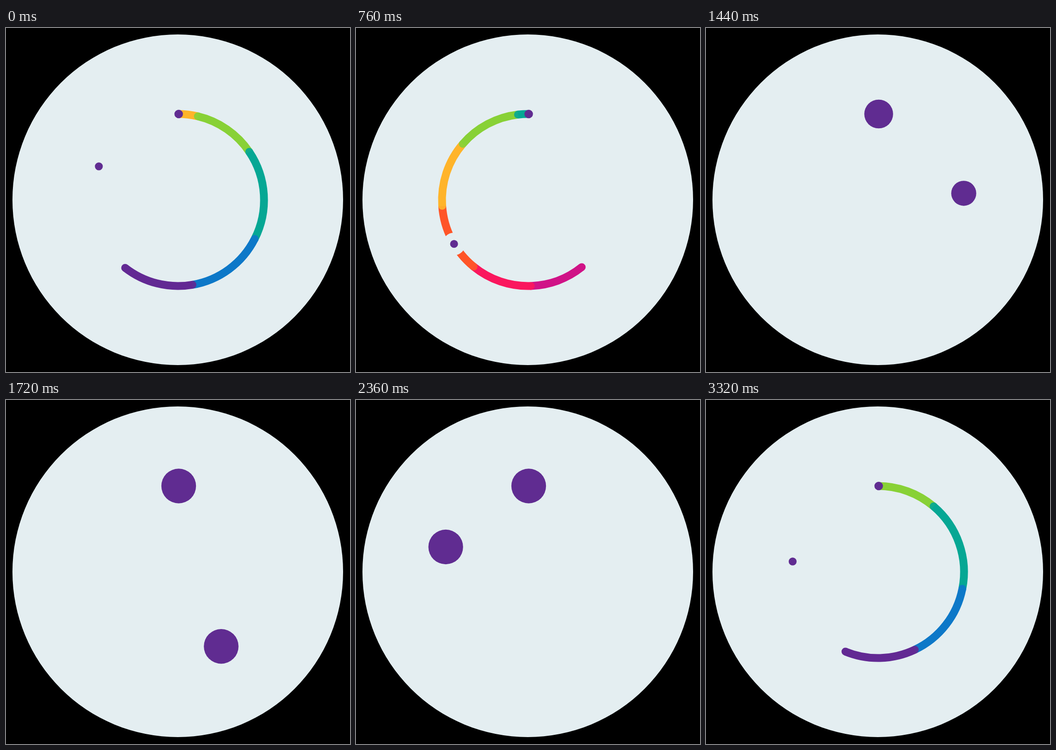
Animation of 748 by 748 pixels, one loop 3.36 s. Source, as an HTML page with a canvas:

```html
<!DOCTYPE html>
<html>
<head>
<meta charset="utf-8">
<style>
html, body { margin: 0; width: 100%; height: 100%; overflow: hidden; background: #000; }
canvas { display: block; }
</style>
</head>
<body>
<canvas id="stage" width="748" height="748"></canvas>
<script>
const ctx = document.getElementById('stage').getContext('2d');
const LOOP = 3360, STEP = 40, START = 2800;
const C = 374, R = 187, WIDTH = 17;
const BIG = 37.7, SMALL = 8.6, NECK = 9.3;
const BG = '#e4eef1', PURPLE = '#602c91';
const SPEED = 360 / 23;

// [colour, length in degrees], head first
const SEGMENTS = [
  ['#622993', 47.6], ['#0d78c8', 53.4], ['#06a794', 61], ['#88d136', 42.6],
  ['#ffb42a', 44.6], ['#ff5528', 46.9], ['#fa175e', 41.1], ['#d01387', 36.8]
];

// [step, angle, speed] for the fast laps of the small dot
const LAPS = [[0, 0, 34], [5, 138.5, 20.5], [13.5, 285, 16], [25, 471.6, 15.9], [42, 732.5, 13.5]];

const clamp = (v, lo = 0, hi = 1) => Math.min(hi, Math.max(lo, v));
const mix = (a, b, p) => a + (b - a) * clamp(p);
const rad = deg => (deg - 90) * Math.PI / 180;
const onRing = deg => [C + R * Math.cos(rad(deg)), C + R * Math.sin(rad(deg))];

function disc(x, y, r, color) {
  ctx.fillStyle = color;
  ctx.beginPath();
  ctx.arc(x, y, r, 0, Math.PI * 2);
  ctx.fill();
}

function hermite(keys, n) {
  let i = 0;
  while (i < keys.length - 2 && n > keys[i + 1][0]) i++;
  const [t0, a, va] = keys[i], [t1, b, vb] = keys[i + 1];
  const d = t1 - t0, s = (n - t0) / d, q = 1 - s;
  return q * q * (1 + 2 * s) * a + s * s * (3 - 2 * s) * b + d * s * q * (q * va - s * vb);
}

function dotAngle(n) {
  if (n < 42) return hermite(LAPS, n);
  const m = n - 41;
  return Math.min(360, 12.5 + 9.22 * (m - 1) - 0.001 * ((m - 10) ** 3 + 729));
}

function dotRadius(n) {
  return mix(SMALL, BIG, (n - 42) / 12.5);
}

function ballRadius(n) {
  if (n < 30) return mix(BIG, NECK, 1 - Math.pow(1 - clamp(n / 10), 1.28));
  return mix(NECK, BIG, (n - 40.7) / 12);
}

function drawSnake(n) {
  const parts = [];
  let end = n * SPEED - 1.2;
  for (const [color, len] of SEGMENTS) {
    parts.push([color, end - len, end]);
    end -= len;
  }
  const head = parts[0][2], tail = end;
  ctx.lineWidth = WIDTH;
  for (const [color, from, to] of parts.reverse()) {
    const a = clamp(from, 0, 360), b = clamp(to, 0, 360);
    if (b > a) {
      ctx.strokeStyle = color;
      ctx.beginPath();
      ctx.arc(C, C, R, rad(a), rad(b));
      ctx.stroke();
    }
    if (from > 0 && from < 360) {
      ctx.globalAlpha = from === tail ? 1 : 0.92;
      disc(...onRing(from), WIDTH / 2, color);
      ctx.globalAlpha = 1;
    }
    if (to === head && to > 0 && to < 360) disc(...onRing(to), WIDTH / 2, color);
  }
}

function draw(ms) {
  const t = Math.floor((ms % LOOP) / STEP) * STEP;
  const n = ((t - START + LOOP) % LOOP) / STEP;
  ctx.fillStyle = '#000';
  ctx.fillRect(0, 0, 748, 748);
  disc(373.5, 373.5, 359.5, BG);
  drawSnake(n);
  const [x, y] = onRing(dotAngle(n)), r = dotRadius(n);
  disc(x, y, r + 16, BG);
  disc(x, y, r, PURPLE);
  disc(375.5, 187, ballRadius(n), PURPLE);
}

let begin;
function tick(now) {
  if (begin === undefined) begin = now;
  draw(now - begin);
  requestAnimationFrame(tick);
}
draw(0);
requestAnimationFrame(tick);
</script>
</body>
</html>
```
